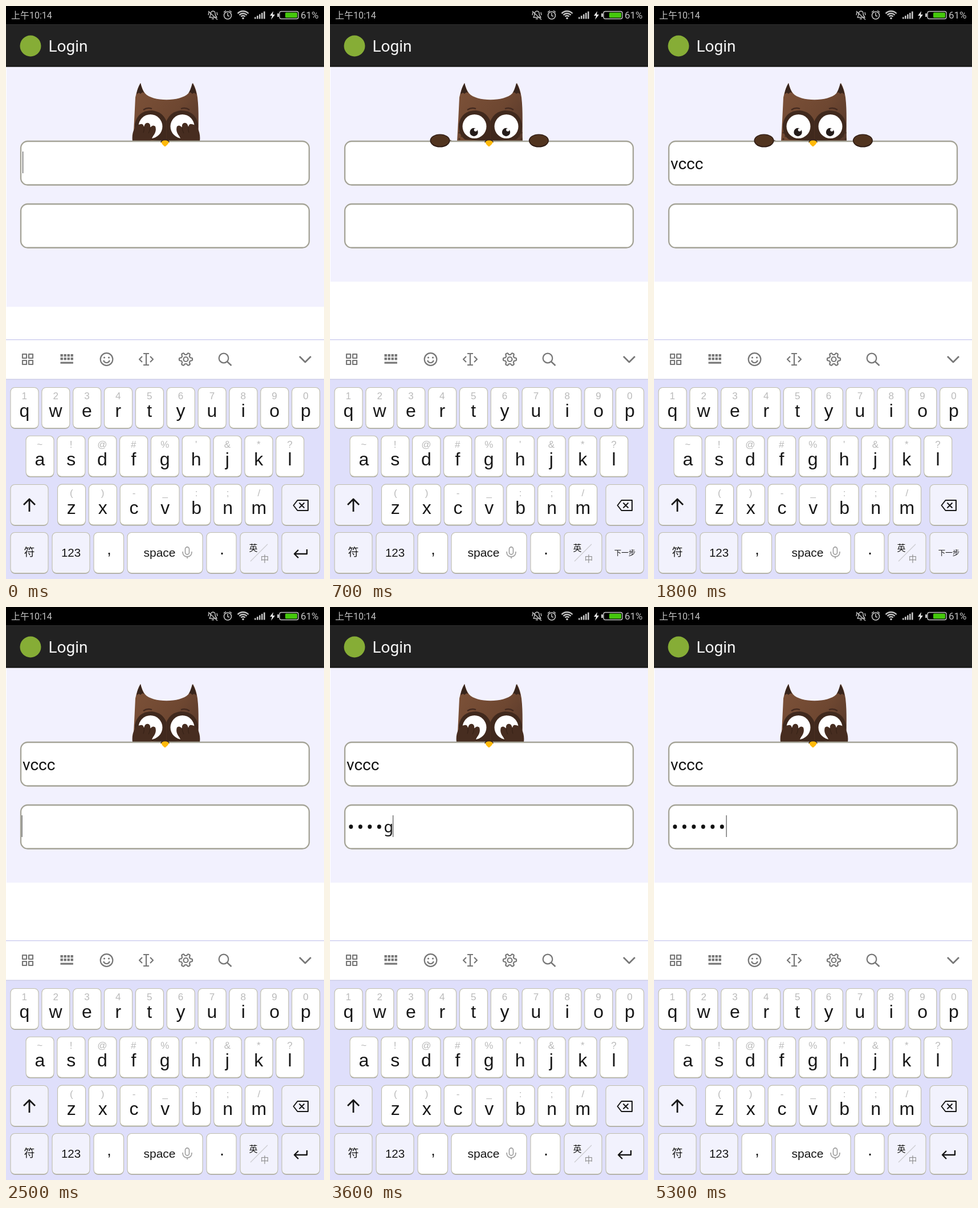
Write an HTML page with a canvas that moves like this. It is 558 px wide and 1004 px high and loops after 5700 ms.

```html
<!DOCTYPE html>
<html lang="en">
<head>
<meta charset="utf-8">
<title>Login</title>
<style>
html, body { margin: 0; width: 100%; height: 100%; overflow: hidden; background: #fff; }
canvas { display: block; width: 558px; height: 1004px; }
</style>
</head>
<body>
<canvas id="stage" width="558" height="1004"></canvas>
<script>
const g = document.getElementById('stage').getContext('2d');
const LOOP = 5700, STEP = 100, TAU = Math.PI * 2;
const ROBOTO = 'Roboto, "Noto Sans CJK SC", "Noto Sans CJK", sans-serif';
const SANS = '"Liberation Sans", "Noto Sans CJK SC", "Noto Sans CJK", sans-serif';
const MONO = '"Noto Sans Mono", monospace';
const NAME = 'vccc', NAME_AT = [1000, 1200, 1300, 1400];
const PASS = 'gfgfgf', PASS_AT = [2700, 2900, 3100, 3300, 3500, 3800], MASK_AT = 5300;
const CELL = 16.5, INK = '#171717', GREY = '#777777';

const clamp = v => Math.max(0, Math.min(1, v));
const within = (t, a, b) => t >= a && t < b;
const countBy = (times, t) => times.filter(at => t >= at).length;

function rect(x, y, w, h, color) {
  g.fillStyle = color;
  g.fillRect(x, y, w, h);
}
function text(str, x, y, size, color, family = ROBOTO, align = 'left', weight = '') {
  g.font = `${weight} ${size}px ${family}`;
  g.textAlign = align;
  g.fillStyle = color;
  g.fillText(str, x, y);
}
function oval(x, y, rx, ry, color) {
  g.fillStyle = color;
  g.beginPath();
  g.ellipse(x, y, rx, ry, 0, 0, TAU);
  g.fill();
}
function ring(x, y, r, from = 0, to = TAU) {
  g.beginPath();
  g.arc(x, y, r, from, to);
  g.stroke();
}
function box(x, y, w, h, r) {
  g.beginPath();
  g.roundRect(x, y, w, h, r);
}
function fill(d, color) {
  g.fillStyle = color;
  g.fill(new Path2D(d));
}
function line(d, color, width) {
  pen(color, width);
  g.stroke(new Path2D(d));
}
function pen(color, width) {
  g.strokeStyle = color;
  g.lineWidth = width;
}
// Draws once as is and once mirrored about a vertical axis.
function mirrored(axis, draw) {
  draw();
  g.save();
  g.translate(axis * 2, 0);
  g.scale(-1, 1);
  draw();
  g.restore();
}

function statusBar() {
  const c = '#c4c4c4';
  rect(0, 0, 558, 32, '#000');
  text('上午10:14', 9, 22, 16, c);
  // muted bell
  line('M357 20 Q359 17 359 13 Q360 9 363 9 Q367 9 367 13 Q367 17 370 20 Z M361 22.5 H365 M355 9 L371 24 M356 11 L355 16 M370 11 L371 16', c, 1.4);
  // alarm clock
  pen(c, 1.6);
  ring(389, 16.5, 6.5);
  line('M389 12 V17 L392 18 M382 11 L386 8 M396 11 L392 8', c, 1.5);
  // wifi
  pen(c, 2.3);
  [13, 9, 5].forEach(r => ring(416, 22, r, -Math.PI * 0.76, -Math.PI * 0.24));
  oval(416, 21.5, 1.8, 1.8, c);
  // signal
  for (let i = 0; i < 5; i++) rect(436 + i * 4, 19.5 - i * 2.5, 2.6, 3 + i * 2.5, c);
  fill('M469 9 L463 17 H467 L465 24 L472 15 H468 Z', '#eee');
  // battery
  pen(c, 1.4);
  box(480, 9.5, 33, 13, 3);
  g.stroke();
  rect(476, 13, 3, 6, c);
  box(490, 11.5, 21, 9, 1.5);
  g.fillStyle = '#45c80c';
  g.fill();
  text('61%', 517, 22, 17, c);
}

function actionBar() {
  rect(0, 32, 558, 74.5, '#222222');
  rect(0, 32, 558, 1, '#2e2e2e');
  rect(0, 104.5, 558, 2, '#171714');
  oval(43, 70, 18.5, 18.5, '#86ad36');
  text('Login', 74.5, 80, 28, '#f6f6f6');
}

function owlBody() {
  const fur = g.createLinearGradient(224, 150, 338, 236);
  fur.addColorStop(0, '#7c5138');
  fur.addColorStop(0.55, '#6e4731');
  fur.addColorStop(1, '#54372a');
  fill('M223 237 C225 205 226 180 227 160 Q230 146 236 135 Q239 147 244 153 C257 168 306 168 320 153 Q325 147 328 135 Q334 146 336 160 C339 185 337 210 338 237 Z', fur);
  mirrored(281.5, () => {
    fill('M236 135 Q230 145 229 155 Q233 150 236 154 Q240 149 243 153 Q239 147 236 135 Z', '#38251c');
    line('M241 182 Q248 177 256 180', '#43291f', 2.2);
    fill('M281.5 202 Q275 185 256 183 Q231 183 226 207 Q225 226 237 234 L281.5 237 Z', '#40291d');
    oval(253.5, 211, 21, 21, '#fff');
    for (const [x, y] of [[227, 222], [231, 228], [227, 233]]) oval(x, y, 1.6, 1.6, '#463022');
  });
  [252.5, 309].forEach(x => {
    oval(x, 221, 7.2, 7.2, '#241c1a');
    oval(x + 3, 217, 2.8, 2.8, '#fff');
  });
}

function wings(open) {
  mirrored(281, () => {
    g.save();
    g.translate(-38 * open, 30 * open * open);
    fill('M222 237 C220 222 226 208 236 207 Q241 206 242 212 Q244 203 250 205 Q254 207 253 213 Q258 207 262 211 Q265 219 258 228 Q255 234 253 237 L253 260 H222 Z', '#472d20');
    line('M242 211 Q243 217 241 222 M253 212 Q253 218 250 223', '#382318', 1.2);
    g.restore();
  });
}

function hands(open) {
  const s = clamp((open - 0.67) / 0.33);
  if (s > 0) mirrored(279.7, () => {
    const x = 209 - 16 * s;
    oval(x, 236, 17.5 * s, 11.5 * s, '#2e1b14');
    oval(x, 235.7, 16 * s, 10 * s, '#51341f');
  });
  fill('M271 239 Q273 233 279 233 Q285 233 287 239 Z', '#3a241b');
  fill('M272.5 239 Q274 235 279 235.5 Q284 235 286 239 Q284 243 279 246.5 Q274 243 272.5 239 Z', '#ffb90a');
}

function field(y) {
  box(26, y + 1, 506, 76.5, 12);
  g.fillStyle = '#fff';
  g.fill();
  pen('#a4a396', 2.3);
  g.stroke();
}
function caret(x, y) {
  rect(x, y, 1.2, 38, '#555');
}

function form(t) {
  const bottom = t < 100 ? 527 : t < 700 ? 499 : 483;
  rect(0, 106, 558, 479, '#fff');
  rect(1, 106, 557, bottom - 106, '#f2f1fe');

  const open = t < 1900 ? clamp(t / 600) : 1 - clamp((t - 1900) / 600);
  g.save();
  g.beginPath();
  g.rect(0, 107, 558, 130);
  g.clip();
  owlBody();
  wings(open);
  g.restore();
  field(236);
  field(346);
  hands(open);

  const name = NAME.slice(0, countBy(NAME_AT, t));
  text(name, 29, 285.5, 28, '#111');
  if (t < 500 || within(t, 1000, 1800)) {
    g.font = `28px ${ROBOTO}`;
    caret(29 + g.measureText(name).width, 255);
  }

  const n = countBy(PASS_AT, t);
  const dots = t >= MASK_AT ? n : n - 1;
  for (let i = 0; i < dots; i++) oval(36.8 + i * CELL, 385, 3.5, 3.7, '#111');
  if (n && dots < n) text(PASS[n - 1], 28.5 + dots * CELL, 395, 27.5, '#111', MONO);
  const shown = [[2100, 2600], [2700, 3900], [4200, 4700], [5200, LOOP]];
  if (shown.some(([a, b]) => within(t, a, b))) caret(28.5 + n * CELL - 1, 365);
}

function toolbar() {
  rect(0, 584, 558, 71, '#fff');
  rect(0, 584, 558, 1.3, '#c9c9ee');
  rect(0, 653.5, 558, 1.3, '#c4c4e4');
  pen(GREY, 2.2);
  for (let i = 0; i < 4; i++) g.strokeRect(29 + (i % 2) * 11, 610 + (i >> 1) * 11, 7, 7);
  for (let i = 0; i < 8; i++) rect(95.5 + (i % 4) * 6, 610 + (i >> 2) * 6, 4.4, 4.4, GREY);
  rect(95.5, 623.5, 22.4, 3.2, GREY);
  // smiley
  ring(176.5, 619, 10.8);
  ring(176.5, 619.5, 5.5, 0.25, Math.PI - 0.25);
  oval(172.5, 616, 1.6, 1.6, GREY);
  oval(180.5, 616, 1.6, 1.6, GREY);
  line('M241 609 H251 M246 609 V629 M241 629 H251 M239 614 L234 619 L239 624 M253 614 L258 619 L253 624', GREY, 2.2);
  // gear
  g.beginPath();
  for (let i = 0; i <= 72; i++) {
    const a = i / 72 * TAU, r = 9.8 + 1.8 * Math.tanh(2.5 * Math.cos(6 * a));
    g.lineTo(315.5 + r * Math.cos(a), 619 + r * Math.sin(a));
  }
  g.stroke();
  ring(315.5, 619, 4);
  ring(382, 617, 8.3);
  line('M388 623 L395.5 630', GREY, 2.4);
  line('M515 614 L525 624 L535 614', GREY, 2.8);
}

function key(x, y, w, face = '#fff') {
  box(x, y + 1.3, w, 71, 7.5);
  g.fillStyle = '#9c9b8c';
  g.fill();
  box(x, y, w, 71, 7.5);
  g.fillStyle = face;
  g.fill();
  pen('#bfbeac', 1.1);
  g.stroke();
}

const ROWS = [
  ['qwertyuiop', '1234567890', 8],
  ['asdfghjkl', "~!@#%'&*?", 35],
  ['zxcvbnm', '()-_:;/', 90.5]
];

function pressedKey(t) {
  const hit = (times, word) => word[times.findIndex(at => within(t, at - STEP, at))];
  return hit(NAME_AT, NAME) || hit(PASS_AT, PASS);
}

function keyboard(t) {
  const soft = '#f2f2fd', down = pressedKey(t);
  rect(0, 655, 558, 349, '#dfdffb');
  ROWS.forEach(([letters, hints, left], row) => {
    const y = 668.5 + row * 84.8;
    [...letters].forEach((ch, i) => {
      const x = left + i * 54.85, mid = x + 24.3, held = ch === down;
      key(x, y, 49, held ? '#c9c9cd' : '#fff');
      text(hints[i], mid, y + 20.5, 17, held ? '#bcbcae' : '#b9b9b9', SANS, 'center');
      text(ch, mid, y + 51.5, 32, INK, SANS, 'center');
    });
  });

  key(8, 838.5, 66, soft);
  key(484, 838.5, 66.5, soft);
  line('M41 886 V865 M31 874 L41 864 L51 874', INK, 2.8);
  line('M504.5 875 L511.5 866 H530 V884 H511.5 Z M514.5 870.5 L523.5 879.5 M523.5 870.5 L514.5 879.5', INK, 2);

  [[8, 66, soft], [81, 66, soft], [154, 52.5], [213, 132], [352, 52], [411, 66, soft], [484, 66.5, soft]]
    .forEach(([x, w, face]) => key(x, 922.5, w, face));
  text('符', 41, 964, 19, INK, SANS, 'center');
  text('123', 114, 965, 20.5, INK, SANS, 'center');
  text(',', 181, 961, 27, INK, SANS, 'center');
  text('space', 241.5, 965, 21, INK, SANS);
  text('.', 379, 961, 29, INK, SANS, 'center');
  // microphone
  pen('#a4a4a4', 1.8);
  box(314.5, 948, 7, 13, 3.5);
  g.stroke();
  line('M310 956 Q310 965 318 965 Q326 965 326 956 M318 965 V968', '#a4a4a4', 1.8);

  text('英', 434, 954.5, 15, INK, SANS, 'center', '500');
  text('中', 454, 973.5, 14.5, '#8c8c8c', SANS, 'center');
  line('M429 973 L459 943', '#cacace', 1.1);
  if (within(t, 100, 2100)) text('下一步', 517.5, 963, 12.5, INK, SANS, 'center');
  else line('M528 952 V960 H507 M513 953 L506 960 L513 967', INK, 2.4);
}

function frame(now) {
  const t = Math.floor((now % LOOP) / STEP) * STEP;
  g.lineCap = 'butt';
  g.lineJoin = 'round';
  form(t);
  statusBar();
  actionBar();
  toolbar();
  keyboard(t);
}

const start = performance.now();
function tick() {
  frame(performance.now() - start);
  requestAnimationFrame(tick);
}
tick();
</script>
</body>
</html>
```
